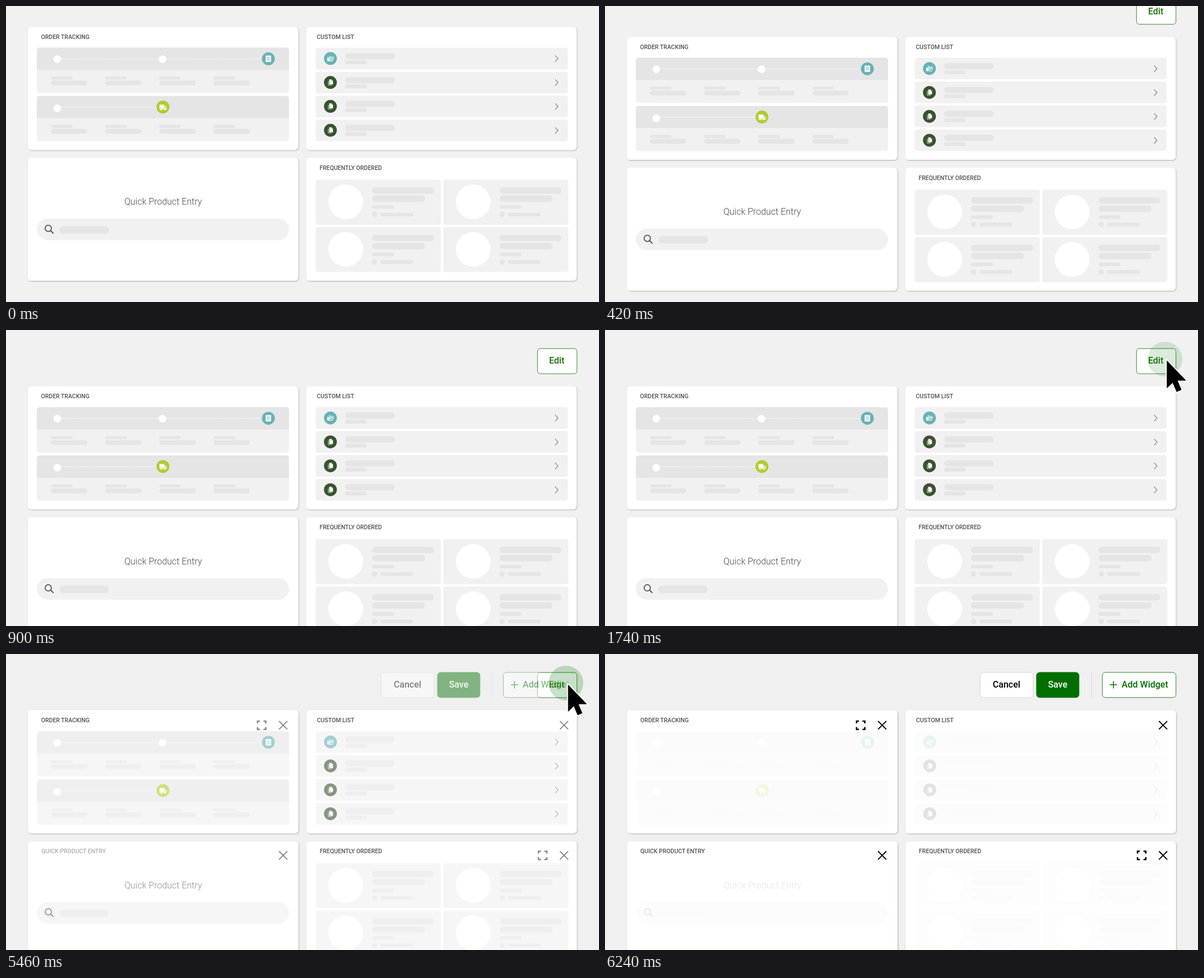
An HTML page for the animation above (7230 ms loop, 1058 by 529 pixels).

```html
<!DOCTYPE html>
<html lang="en">
<head>
<meta charset="utf-8">
<title>Dashboard edit mode</title>
<style>
  html, body { margin: 0; width: 100%; height: 100%; overflow: hidden; background: #f1f1f1; }
  svg { display: block; width: 100%; height: 100%; }
  text { font-family: Roboto, sans-serif; }
  .title { font-size: 10.5px; font-weight: 500; fill: #505050; }
  .btn { font-size: 16px; font-weight: 500; }
  .quick { font-size: 16px; font-weight: 300; fill: #4a4a4a; }
</style>
</head>
<body>
<svg id="stage" viewBox="0 0 1058 529" xmlns="http://www.w3.org/2000/svg"></svg>
<script>
const LOOP = 7230;
const SCROLL = 63.4;
const PANEL = '#f1f1f1', BAR = '#e5e5e5', TEAL = '#67b2b4', LIME = '#b5c92e', FOREST = '#38532f', GREEN = '#006f00';

const rect = (x, y, w, h, r, fill, extra = '') =>
  `<rect x="${x}" y="${y}" width="${w}" height="${h}" rx="${r}" fill="${fill}" ${extra}/>`;
const bar = (x, y, w, h) => rect(x, y, w, h, h / 2, BAR);
const dot = (x, y, r, fill) => `<circle cx="${x}" cy="${y}" r="${r}" fill="${fill}"/>`;
const path = (d, fill) => `<path d="${d}" fill="${fill}"/>`;
const stroke = (d, color, w, extra = '') =>
  `<path d="${d}" fill="none" stroke="${color}" stroke-width="${w}" ${extra}/>`;
const text = (x, y, cls, s, extra = '') => `<text x="${x}" y="${y}" class="${cls}" ${extra}>${s}</text>`;
const at = (x, y, body) => `<g transform="translate(${x} ${y})">${body}</g>`;

// Badges, centred on 0,0
const badge = (fill, glyph) => dot(0, 0, 11.5, fill) + glyph;
const receipt = badge(TEAL,
  path('M-4.8-6l1.2 .8 1.2-.8 1.2 .8 1.2-.8 1.2 .8 1.2-.8 1.2 .8 1.2-.8V6l-1.2-.8-1.2 .8-1.2-.8L0 6l-1.2-.8-1.2 .8-1.2-.8-1.2 .8z', '#fff') +
  stroke('M-3-2.4h6M-3 0h6M-3 2.4h6', TEAL, .9));
const truck = badge(LIME,
  path('M-6.2-4.3h8.4v2.2h2.2L6.8 .9v3.4h-13z', '#fff') +
  path('M2.9-1.1h1.3L5.6 .9H2.9z', LIME) +
  [-3.2, 3.7].map(x => dot(x, 4.2, 2.4, LIME) + dot(x, 4.2, 1.7, '#fff')).join(''));
const folder = badge(TEAL,
  path('M-2.8-4.6h3.2l1.2 1.2h4.6v5.8h-9z', '#b9dcdd') +
  stroke('M-4.9-2.2v6.4h9.4', '#fff', 1.3) +
  path('M-4.9-1h3.2v4h-3.2z', '#fff'));
const pages = badge(FOREST,
  stroke('M-3.7-2.4v7.4h6', '#c5cdc2', 1.1) +
  path('M-2.2-5.2h4.1l2.7 2.7v6.2h-6.8z', '#fff') +
  stroke('M1.9-5v2.6h2.5', '#b0bbad', .6));

function trackPanel(y, dots, end, icon) {
  const mid = y + 20.3;
  let s = rect(55, y, 450, 80.8, 5, PANEL) +
    path(`M55 ${y + 39.7}v-34.7a5 5 0 0 1 5-5h440a5 5 0 0 1 5 5v34.7z`, BAR) +
    stroke(`M98 ${mid - .3}H${end}`, '#fff', .9, 'stroke-dasharray="1.6 .8"');
  for (const x of dots) s += dot(x, mid + .2 + (dots.length < 2 ? 1.6 : 0), 6.8, '#fff');
  for (let i = 0; i < 4; i++) {
    const x = 80.3 + 96.6 * i;
    s += bar(x, y + 51.5, 38.6, 5.5) + bar(x, y + 58.7, 65, 8.8);
  }
  return s + at(end + 11.3, mid - .6, icon);
}

const tracking = trackPanel(74.6, [91.5, 279.3], 456.8, receipt) + trackPanel(160.8, [91.5], 268.7, truck);

const list = [0, 1, 2, 3].map(i => {
  const y = 74.7 + 42.75 * i;
  return rect(552.5, y, 449.8, 38.5, 4, PANEL) +
    at(578.8, y + 19.1, i ? pages : folder) +
    bar(605, y + 9.2, 88.4, 11.2) + bar(605, y + 22.4, 39, 7) +
    stroke(`M979.7 ${y + 13.8}l5.2 5.6-5.2 5.6`, '#747474', 1.1);
}).join('');

const quick = text(280.4, 355.3, 'quick', 'Quick Product Entry', 'text-anchor="middle"') +
  rect(55, 380, 450, 38.5, 19.25, PANEL) +
  '<circle cx="75.4" cy="397.4" r="5.6" fill="none" stroke="#4f4f4f" stroke-width="1.7"/>' +
  stroke('M79.4 401.4l5.3 5.1', '#4f4f4f', 2) +
  rect(95, 393.3, 88.2, 13.4, 6, BAR);

const tile = at.bind(null);
const product = rect(552.5, 310.3, 223.3, 80.6, 4, PANEL) + dot(606, 350.2, 31, '#fff') +
  bar(653, 324, 110.5, 11.4) + bar(653, 338.6, 94.8, 11.4) + bar(653, 356, 39.3, 6.6) +
  dot(657.6, 372.6, 4.8, BAR) + bar(668.2, 369.4, 58.4, 6.6);
const frequent = [0, 1, 2, 3].map(i => at(227.5 * (i % 2), 84.7 * (i >> 1), product)).join('');

const cards = [
  { x: 39, y: 37.2, tx: 62.5, ty: 59.1, title: 'ORDER TRACKING', body: tracking },
  { x: 535.7, y: 37.2, tx: 554.5, ty: 59.1, title: 'CUSTOM LIST', body: list },
  { x: 39, y: 271, tx: 62.5, ty: 293.1, title: '', editTitle: 'QUICK PRODUCT ENTRY', body: quick },
  { x: 535.7, y: 271, tx: 559.5, ty: 293.1, title: 'FREQUENTLY ORDERED', body: frequent }
];
const drawCards = (editing) => cards.map(c =>
  rect(c.x, c.y, 482.4, 220, 6, '#fff', 'filter="url(#shade)"') +
  `<g opacity="${editing ? .15 : 1}">${c.body}</g>` +
  text(c.tx, c.ty, 'title', editing && c.editTitle || c.title)).join('');

const cross = (x, y) => at(x, y, stroke('M-7.4-7.4L7.4 7.4M7.4-7.4L-7.4 7.4', '#000', 1.9));
const expand = (x, y) => at(x, y, stroke('M-7.4-3.2v-4.2h4.2M3.2-7.4h4.2v4.2M7.4 3.2v4.2H3.2M-3.2 7.4h-4.2V3.2', '#000', 2.5));
const button = (x, w, fill, line) => rect(x, 32.9, w, 44.9, 5.5, fill, `stroke="${line}"`);
const label = (x, s, fill) => text(x, 60.2, 'btn', s, `fill="${fill}" text-anchor="middle"`);

const toolbar = button(669.4, 94.4, '#fff', '#d6d6d6') + label(716.4, 'Cancel', '#000') +
  button(769.9, 75.8, GREEN, GREEN) + label(807.7, 'Save', '#fff') +
  stroke('M868 32.5v45', '#d4d4d4', 1) +
  button(887.3, 131.4, '#fff', '#2b862b') +
  stroke('M900.6 55h13M907.1 48.5v13', GREEN, 1.5) + label(963.3, 'Add Widget', GREEN);

document.getElementById('stage').innerHTML = `
  <defs><filter id="shade" x="-2%" y="-3%" width="104%" height="107%">
    <feDropShadow dx=".9" dy="1" stdDeviation=".8" flood-color="#000" flood-opacity=".3"/>
  </filter></defs>
  <g id="view">${drawCards(false)}
    <g id="edit">${at(0, -SCROLL, rect(948.3, 33.2, 70.4, 45, 5, '#fff', 'stroke="#3a8a2c"') + label(982.6, 'Edit', '#1d6f0a'))}</g>
  </g>
  <g id="editing">${rect(0, 0, 1058, 529, 0, '#f0f0f0')}
    ${at(.6, SCROLL, drawCards(true))}${toolbar}
    ${expand(456.2, 127.3)}${cross(494.5, 127.3)}${cross(995.7, 127.3)}
    ${cross(494.5, 359.9)}${expand(957.5, 359.9)}${cross(995.7, 359.9)}
  </g>
  <g id="pointer">
    <circle id="halo" cx="999" cy="52" r="31" fill="#007400"/>
    <path id="arrow" d="M1002.3 54.3V104.2L1012.8 94.4 1019.8 110.8 1028.6 107 1021.6 90.6H1037z"
      fill="#000" stroke="#fff" stroke-width="3.6" paint-order="stroke"/>
  </g>`;

const [view, edit, editing, pointer, halo, arrow] =
  ['view', 'edit', 'editing', 'pointer', 'halo', 'arrow'].map(id => document.getElementById(id));

const ramp = (t, a, b) => Math.min(1, Math.max(0, (t - a) / (b - a)));
const smooth = u => u * u * (3 - 2 * u);

// Cubic bezier easing (x1, 0, x2, 1), solved by bisection
function ease(u, x1, x2) {
  let lo = 0, hi = 1;
  for (let i = 0; i < 24; i++) {
    const s = (lo + hi) / 2, r = 1 - s;
    if (3 * r * r * s * x1 + 3 * r * s * s * x2 + s * s * s < u) lo = s; else hi = s;
  }
  return smooth((lo + hi) / 2);
}

function draw(t) {
  const mode = smooth(ramp(t, 5190, 5760));
  const press = t < 5190 ? 0 : 1 - mode;
  const scale = 1 - .045 * press;
  view.setAttribute('transform', `translate(0 ${SCROLL * ease(ramp(t, 0, 900), .6, .665)})`);
  view.setAttribute('visibility', mode < 1 ? 'visible' : 'hidden');
  edit.setAttribute('opacity', ramp(t, 0, 240));
  editing.setAttribute('opacity', mode);
  pointer.setAttribute('opacity', ramp(t, 1500, 1740) * (1 - ramp(t, 5970, 6240)));
  halo.setAttribute('opacity', .14 + .145 * press);
  arrow.setAttribute('transform', `translate(1021 60) scale(${scale}) translate(-1021 -60)`);
}

const start = performance.now();
function tick() {
  draw((performance.now() - start) % LOOP);
  requestAnimationFrame(tick);
}
tick();
</script>
</body>
</html>
```
